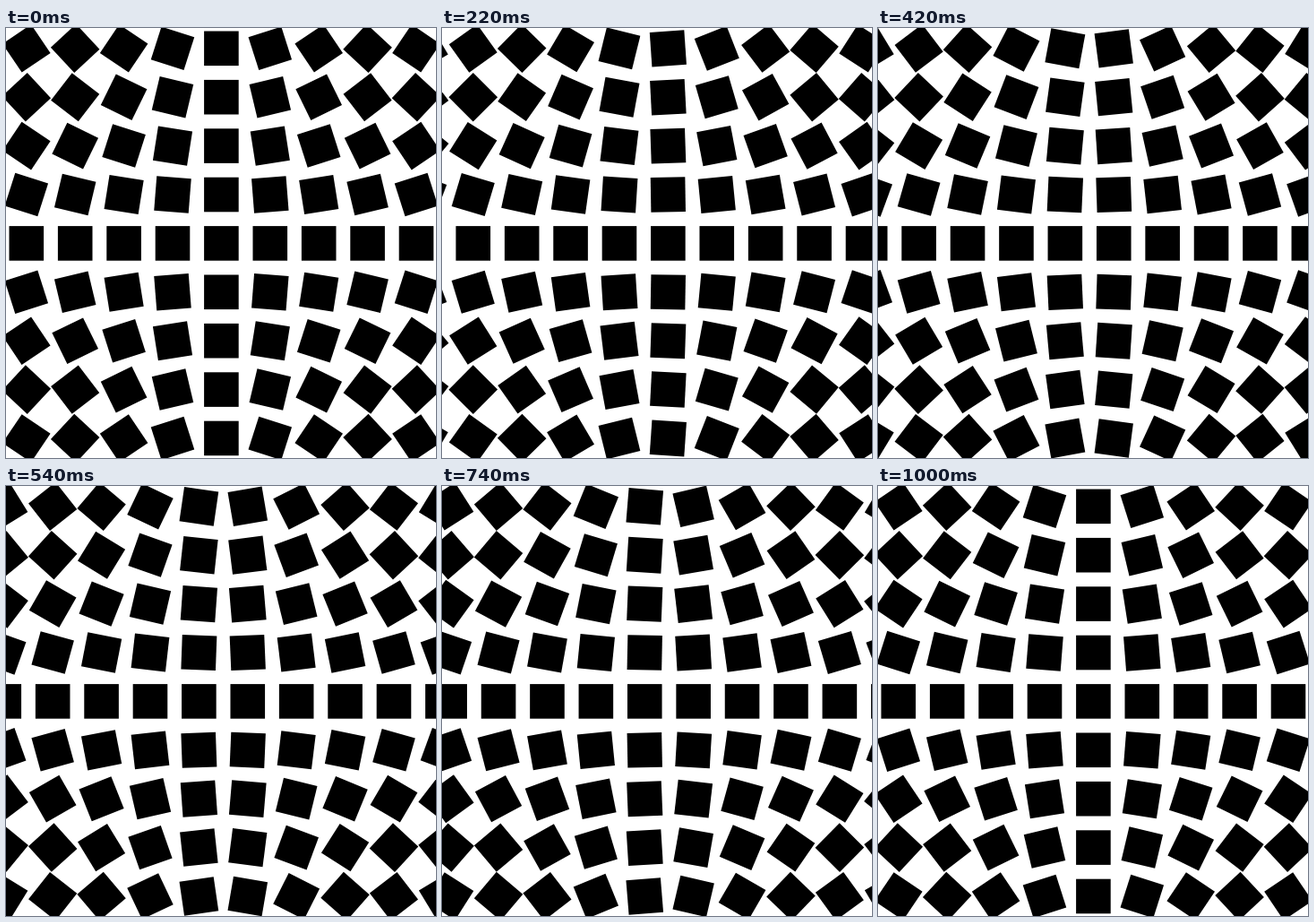
An HTML page with a canvas that plays this animation: 480 px wide and 480 px high, repeating every 1.02 s.

```html
<!DOCTYPE html>
<html lang="en">
<head>
<meta charset="utf-8">
<title>Turning squares</title>
<style>
  html, body { margin: 0; width: 100%; height: 100%; overflow: hidden; background: #fff; }
  canvas { display: block; width: 480px; height: 480px; }
</style>
</head>
<body>
<canvas id="stage" width="480" height="480"></canvas>
<script>
const ctx = document.getElementById('stage').getContext('2d');
const CENTER = 240.4, GAP = 54.4, SIDE = 38.6;
const STEP = 20, STEPS = 51;
const start = performance.now();

// Turn grows with the product of the distances to both axes.
const turn = (u, v) => Math.PI / 3 * Math.sin(0.075 * u * v);

function square(u, v) {
  ctx.save();
  ctx.translate(CENTER + u * GAP, CENTER + v * GAP);
  ctx.rotate(turn(u, v));
  ctx.fillRect(-SIDE / 2, -SIDE / 2, SIDE, SIDE);
  ctx.restore();
}

function draw(ms) {
  const step = Math.floor(ms / STEP) % STEPS;
  const shift = step / (STEPS - 1) % 1;
  ctx.fillStyle = '#fff';
  ctx.fillRect(0, 0, 480, 480);
  ctx.fillStyle = '#000';
  for (let row = -4; row <= 4; row++) {
    for (let col = -6; col <= 5; col++) square(col + shift, row);
  }
}

function loop() {
  draw(performance.now() - start);
  requestAnimationFrame(loop);
}
loop();
</script>
</body>
</html>
```
